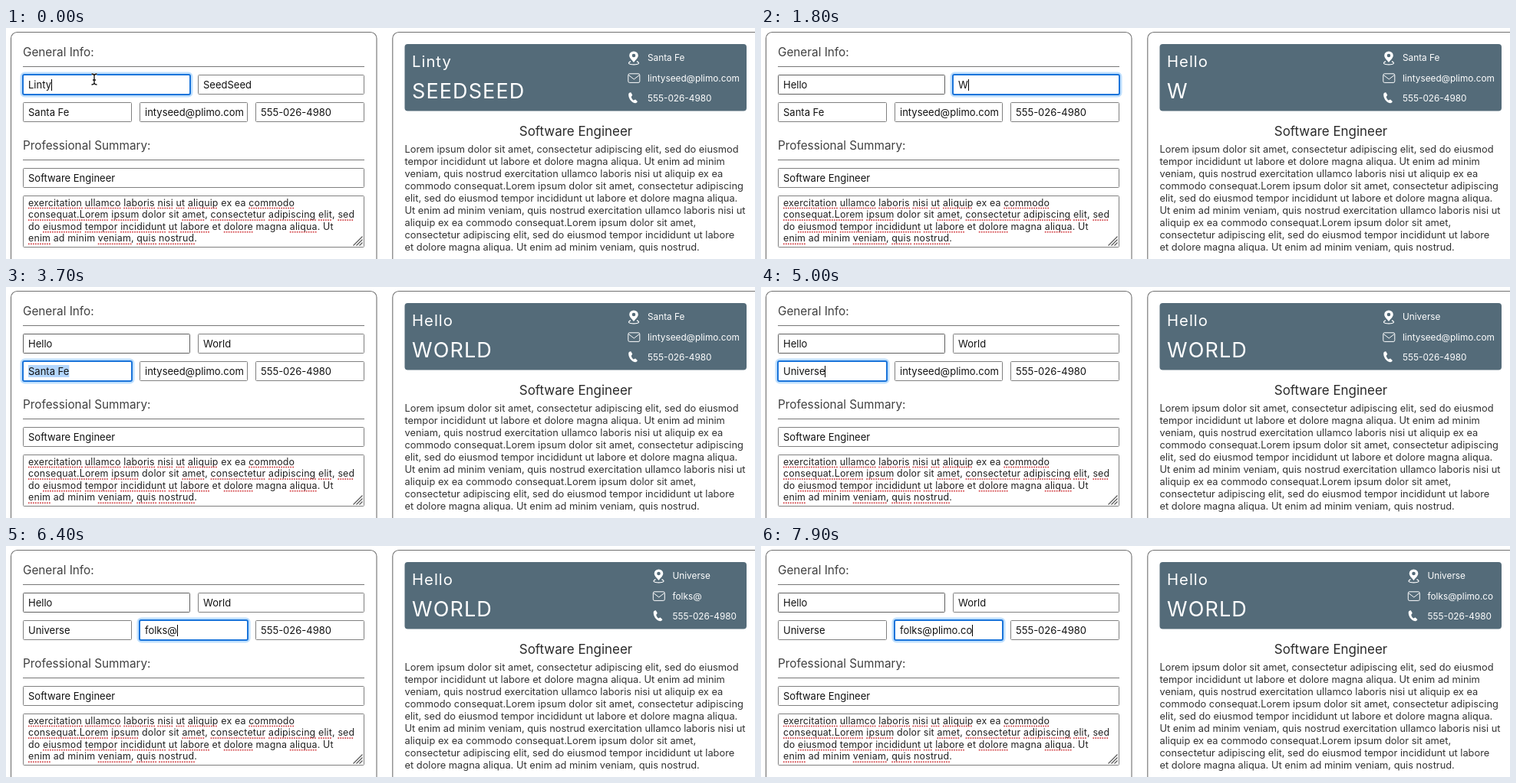
Animation, 976 px wide and 302 px high, one loop 8 s. Source, as an HTML page with a canvas:

```html
<!DOCTYPE html>
<html lang="en">
<head>
<meta charset="utf-8">
<title>Resume builder</title>
<style>
  html, body { margin: 0; width: 100%; height: 100%; overflow: hidden; background: #fff; }
  canvas { display: block; width: 976px; height: 302px; }
</style>
</head>
<body>
<canvas id="stage"></canvas>
<script>
const W = 976, H = 302, LOOP = 8000;
const canvas = document.getElementById('stage');
const ctx = canvas.getContext('2d');
const ratio = window.devicePixelRatio || 1;
canvas.width = W * ratio;
canvas.height = H * ratio;

const FACE = 'Inter, "Open Sans", sans-serif';
const INK = '#333', LINE = '#808080';

const fields = {
  first: { x: 22, y: 61, w: 218 },
  last: { x: 250, y: 61, w: 217 },
  place: { x: 22, y: 97, w: 142 },
  mail: { x: 174, y: 97, w: 141 },
  phone: { x: 325, y: 97, w: 142 },
  job: { x: 22, y: 183, w: 445 }
};

const start = {
  first: 'Linty', last: 'SeedSeed', place: 'Santa Fe',
  mail: 'lintyseed@plimo.com', phone: '555-026-4980', job: 'Software Engineer'
};

// Each entry: field, time it gets selected, typed word, time of each key.
const script = [
  ['first', 100, 'Hello', [400, 500, 800, 900, 1100]],
  ['last', 1300, 'World', [1800, 2000, 2400, 2700, 2700]],
  ['place', 3000, 'Universe', [3800, 4000, 4100, 4200, 4400, 4400, 4600, 4800]],
  ['mail', 5100, 'folks@plimo.co',
    [5400, 5500, 5700, 5800, 6000, 6300, 6800, 6900, 7000, 7100, 7300, 7600, 7800, 7900]]
];

const about = [
  'exercitation ullamco laboris nisi ut aliquip ex ea commodo',
  'consequat.Lorem ipsum dolor sit amet, consectetur adipiscing elit, sed',
  'do eiusmod tempor incididunt ut labore et dolore magna aliqua. Ut',
  'enim ad minim veniam, quis nostrud.'
];
const known = new Set('ex ea dolor sit do et ad minim magna Ut'.split(' '));

const summary = [
  'Lorem ipsum dolor sit amet, consectetur adipiscing elit, sed do eiusmod',
  'tempor incididunt ut labore et dolore magna aliqua. Ut enim ad minim',
  'veniam, quis nostrud exercitation ullamco laboris nisi ut aliquip ex ea',
  'commodo consequat.Lorem ipsum dolor sit amet, consectetur adipiscing',
  'elit, sed do eiusmod tempor incididunt ut labore et dolore magna aliqua.',
  'Ut enim ad minim veniam, quis nostrud exercitation ullamco laboris nisi ut',
  'aliquip ex ea commodo consequat.Lorem ipsum dolor sit amet,',
  'consectetur adipiscing elit, sed do eiusmod tempor incididunt ut labore',
  'et dolore magna aliqua. Ut enim ad minim veniam, quis nostrud.'
];

function stateAt(t) {
  const s = { values: { ...start }, focus: 'first', selected: false };
  for (const [name, from, word, keys] of script) {
    if (t < from) break;
    const count = keys.filter(k => k <= t).length;
    s.focus = name;
    s.selected = count === 0;
    if (count) s.values[name] = word.slice(0, count);
  }
  return s;
}

function font(size, spacing = 0) {
  ctx.font = `${size}px ${FACE}`;
  ctx.letterSpacing = spacing + 'px';
}

function text(str, x, y, color = INK) {
  ctx.fillStyle = color;
  ctx.fillText(str, x, y);
}

function box(x, y, w, h, r, color, width = 1) {
  ctx.beginPath();
  ctx.roundRect(x, y, w, h, r);
  ctx.strokeStyle = color;
  ctx.lineWidth = width;
  ctx.stroke();
}

function rule(y) {
  ctx.fillStyle = '#777';
  ctx.fillRect(22, y, 445, 1);
}

function path(d, color, width) {
  const p = new Path2D(d);
  if (width) {
    ctx.strokeStyle = color;
    ctx.lineWidth = width;
    ctx.stroke(p);
  } else {
    ctx.fillStyle = color;
    ctx.fill(p, 'evenodd');
  }
}

function drawField(name, s) {
  const { x, y, w } = fields[name];
  const focused = s.focus === name;
  let value = s.values[name];
  // The long address is scrolled by one letter.
  if (value === start.mail) value = value.slice(1);

  if (focused) {
    box(x - 1.5, y - 1.5, w + 3, 29, 4, '#c0e0fd', 4);
    ctx.fillStyle = '#fff';
    ctx.fillRect(x, y, w, 26);
    box(x, y, w, 26, 2, '#1a74da', 2);
  } else {
    box(x + .5, y + .5, w - 1, 25, 1, name === 'first' ? '#606060' : LINE);
  }

  font(13);
  const tx = x + 7, tw = ctx.measureText(value).width;
  if (focused && s.selected) {
    ctx.fillStyle = '#b3d6fd';
    ctx.fillRect(tx, y + 5, tw, 16);
  }
  text(value, tx, y + 18, '#111');
  if (focused && !s.selected) {
    ctx.fillStyle = '#000';
    ctx.fillRect(Math.round(tx + tw), y + 6, 1, 15);
  }
}

function drawAbout() {
  box(22.5, 219.5, 444, 67, 1, LINE);
  font(12.4, .17);
  about.forEach((line, i) => {
    const y = 232.5 + i * 15.6;
    text(line, 29, y, '#222');
    let done = '';
    for (const word of line.split(' ')) {
      const bare = word.replace(/[.,]$/, '');
      if (!known.has(bare)) {
        const a = 29 + ctx.measureText(done).width;
        const b = a + ctx.measureText(bare).width;
        ctx.fillStyle = '#d0383c';
        for (let x = a; x < b - 1; x += 3) ctx.fillRect(x, y + 2.2, 1.7, 1.6);
      }
      done += word + ' ';
    }
  });
  path('M452.5 284.5 L464.5 272.5 M456.5 284.5 L464.5 276.5 M460.5 284.5 L464.5 280.5', '#555', 1.1);
}

function drawForm(s) {
  box(6.5, 5.5, 476.5, 330, 8, '#707070', 1.1);
  font(15.3);
  text('General Info:', 22, 36.5, '#404040');
  text('Professional Summary:', 22, 158.5, '#404040');
  rule(50);
  rule(172);
  for (const name in fields) if (name !== s.focus) drawField(name, s);
  drawField(s.focus, s);
  drawAbout();
}

function drawContacts(s) {
  const shift = s.values.mail === start.mail ? 0 : 32.5;
  ctx.save();
  ctx.translate(shift, 0);

  // pin, envelope, handset
  path('M818 45 C815 41 812.2 39 812.2 36 A5.8 5.6 0 0 1 823.8 36 C823.8 39 821 41 818 45Z' +
    'M820.3 36 A2.3 2.3 0 1 0 815.7 36 A2.3 2.3 0 1 0 820.3 36Z', '#fff');
  path('M814 43.6 C809 46 812 47.8 818 47.8 C824 47.8 827 46 822 43.6', '#fff', 1.2);
  box(810.8, 59.8, 15, 11.6, 1.8, '#fff', 1);
  path('M811.2 61.5 L818.3 67 L825.4 61.5', '#fff', 1);
  path('M811.3 86 C812 84.5 813.3 83.8 814.3 84.3 L816.2 87.6 C816.2 88.8 814.7 89.3 814.8 90.2' +
    ' C815.2 92 816.3 93.5 817.7 94.4 C818.6 94.6 819.2 93.3 820.2 93.5 L822.8 96' +
    ' C822.8 97.2 821.5 98.3 820 98.3 C814.3 97.3 810.6 91 811.3 86Z', '#fff');

  font(11.8);
  text(s.values.place, 836, 43.2, '#fff');
  text(s.values.mail, 836, 69.5, '#fff');
  text(s.values.phone, 836, 95.7, '#fff');
  ctx.restore();
}

function drawResume(s) {
  box(503.8, 5.5, 500, 330, 8, '#707070', 1.1);
  ctx.fillStyle = '#546b79';
  ctx.beginPath();
  ctx.roundRect(519.5, 21, 445.5, 87.5, 4);
  ctx.fill();

  font(20.3, 1);
  text(s.values.first, 529, 51, '#fff');
  font(27, 1.1);
  text(s.values.last.toUpperCase(), 529, 92, '#fff');
  drawContacts(s);

  font(16.95);
  ctx.textAlign = 'center';
  text(s.values.job, 742.5, 141, '#2a2a2a');
  ctx.textAlign = 'left';
  font(12.83);
  summary.forEach((line, i) => text(line, 519.5, 163 + i * 16.03));
}

function drawPointer() {
  const d = 'M111.5 60 Q114.5 60 115 62 Q115.5 60 118.5 60 M115 61.5 V72.5' +
    ' M111.5 74 Q114.5 74 115 72 Q115.5 74 118.5 74 M113 68 H117';
  path(d, '#fff', 3);
  path(d, '#111', 1.3);
}

function draw(now) {
  const t = now % LOOP;
  const s = stateAt(t);
  ctx.setTransform(ratio, 0, 0, ratio, 0, 0);
  ctx.fillStyle = '#fff';
  ctx.fillRect(0, 0, W, H);
  drawForm(s);
  drawResume(s);
  if (t < 400) drawPointer();
}

const begin = performance.now();
function tick() {
  draw(performance.now() - begin);
  requestAnimationFrame(tick);
}
tick();
</script>
</body>
</html>
```
